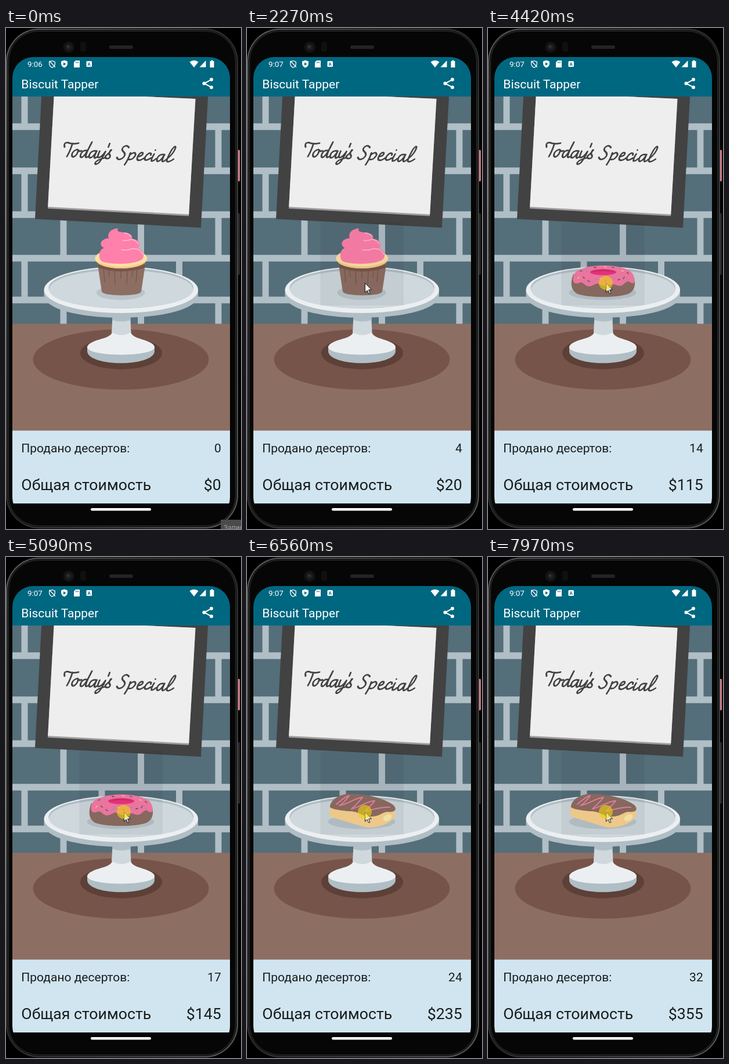
Write an HTML page that moves like this. It is 405x863 px and loops after 8000 ms.

```html
<!DOCTYPE html>
<html lang="ru">
<head>
<meta charset="utf-8">
<title>Biscuit Tapper</title>
<style>
html, body { margin: 0; width: 100%; height: 100%; overflow: hidden; background: #000; }
svg { display: block; width: 405px; height: 863px; }
text { font-family: Roboto, sans-serif; }
.label { font-size: 21px; fill: #191c1e; }
.total { font-size: 26.7px; fill: #191c1e; }
.end { text-anchor: end; }
.line { fill: none; stroke-linecap: round; stroke-linejoin: round; }
</style>
</head>
<body>
<svg viewBox="0 0 405 863">
  <defs>
    <clipPath id="screen"><rect x="11" y="50" width="375" height="795" rx="36"/></clipPath>
    <clipPath id="scene"><path d="M11 118H386V693.5H11Z"/></clipPath>
    <linearGradient id="rim" x2="1" y2="1">
      <stop stop-color="#5a5d5c"/><stop offset=".5" stop-color="#2c2e2d"/><stop offset="1" stop-color="#5a5d5c"/>
    </linearGradient>
  </defs>

  <!-- phone -->
  <rect width="405" height="863"/>
  <rect x="398" y="210" width="5" height="54" rx="1.5" fill="#d67f8e"/>
  <rect x="398" y="319" width="5" height="106" rx="1.5" fill="#2a2a2a"/>
  <rect x="0" y="1" width="400" height="861" rx="57" fill="url(#rim)"/>
  <rect x="2" y="3" width="396" height="857" rx="55" fill="#171818"/>
  <rect x="4.5" y="5.5" width="391" height="852" rx="52" fill="#060606" stroke="#2b2d2d"/>
  <circle cx="108" cy="33" r="9.5" fill="#131414"/>
  <circle cx="108" cy="33" r="5" fill="#1e2122"/>
  <circle cx="107" cy="32" r="2" fill="#34383a"/>
  <rect x="128" y="24" width="10" height="17" rx="4" fill="#101010"/>
  <rect x="178" y="30" width="41" height="6" rx="3" fill="#242424"/>
  <rect x="146" y="827" width="104" height="4.5" rx="2.2" fill="#fff"/>

  <g clip-path="url(#screen)">
    <path d="M11 50H386V119H11Z" fill="#006780"/>
    <path d="M11 693H386V819H11Z" fill="#d0e5ef"/>
  </g>

  <!-- status bar -->
  <g fill="#fff">
    <text id="clock" x="37" y="66.6" font-size="13.4">9:06</text>
    <path class="line" d="M79.5 56.5l4.8 1.8v4q-.8 4-4.8 5.8q-4-1.8-4.8-5.8v-4zM75 57l9.5 10" stroke="#fff" stroke-width="1.3"/>
    <path d="M100.5 55.5l5.5 2v4.5q-.8 4.5-5.5 6.5q-4.7-2-5.5-6.5v-4.5z"/>
    <path d="M99 59.3l4.5 2.7-4.5 2.7z" fill="#006780"/>
    <path d="M120 56h7v12h-10v-9z"/>
    <path d="M120.5 58v2.5m2-2.5v2.5m2-2.5v2.5" stroke="#006780" stroke-width=".9"/>
    <rect x="138.5" y="57" width="9.5" height="10" rx="1.5"/>
    <path class="line" d="M141.2 65l2-5.5 2 5.5m-3.2-1.8h2.4" stroke="#006780"/>
    <path d="M324 68l-7.500-9.500q7.500-5.500 15 0z"/>
    <path d="M333.5 67.5l11-11.5v11.5z"/>
    <path d="M353.5 55.5h3v1.5h2v11h-7v-11h2z"/>
    <text x="26.3" y="104" font-size="21">Biscuit Tapper</text>
    <path d="M354 88.8L341.5 95.5L354 102.2" fill="none" stroke="#fff" stroke-width="2"/>
    <circle cx="354" cy="88.8" r="3"/><circle cx="341.5" cy="95.5" r="3"/><circle cx="354" cy="102.2" r="3"/>
  </g>

  <g clip-path="url(#scene)">
    <!-- wall -->
    <path d="M11 118H386V510H11Z" fill="#546e7a"/>
    <g stroke="#b0bec5">
      <path d="M11 170H386M11 246H386M11 321.5H386M11 396.5H386M11 468.5H386" stroke-width="11.5"/>
      <path d="M32 118v53m0 75v75m0 75v73M165 397v72M298.500 397v72M99 322v75m0 72v41M232.500 322v75m0 72v41M366 170v76m0 76v75m0 72v41" stroke-width="11"/>
    </g>

    <!-- sign -->
    <path d="M61.5 110L348.5 110L336 344L50 329Z" fill="#424242"/>
    <path d="M83 111L326.5 122L315 324L72 311Z" fill="#9e9e9e"/>
    <path d="M83 111L326.5 122L315.2 321L72.2 308Z" fill="#eee"/>
    <g transform="translate(99 221) rotate(3) skewX(-18)">
      <path class="line" stroke="#424242" stroke-width="2.8" aria-label="Today's Special" d="
        M-4-16q-5-8 2-8q9 3 19 0M7-23q1 14-1 23
        M19-13q-6 2-6 8q1 6 5 5q5-4 3-12q2 3 6 1
        M36-12q-7-1-8 6q0 7 4 6q5-3 7-27q-3 20-1 26q2 2 5-2
        M52-12q-8-1-9 6q0 7 4 6q4-2 6-12q-1 8 0 11q2 3 5-2
        M58-12q-1 11 2 11q5 0 8-11q-1 14-4 20q-4 5-6 1q0-6 13-10
        M70-26v6M76-15q-2 7 2 9q3 5-2 6q-4 0-5-3M71-4q4-5 6-11
        M105-21q-5-5-9-1q-4 5 3 9q7 5 2 11q-6 5-10-1
        M111-12q1 10-2 21M111-8q5-6 8-4q4 3 0 9q-3 4-8 2
        M126-6q9-2 6-7q-4-2-6 5q-1 8 4 8q4 0 8-5
        M147-10q0-4-4-3q-5 4-4 10q3 5 10-2
        M152-12q-2 10 0 12q3 1 6-4M151.5-19h.1
        M169-12q-8-1-9 6q0 7 4 6q4-2 6-12q-1 8 0 11q2 3 6-3
        M177-5q8-10 7-20q-2-5-5 4q-3 16-1 20q3 3 10-4"/>
    </g>

    <!-- table and stand -->
    <path d="M11 509.5H386V694H11Z" fill="#8d6e63"/>
    <ellipse cx="198" cy="571" rx="151.5" ry="52" fill="#77544a"/>
    <ellipse cx="198.5" cy="560" rx="70.5" ry="28" fill="#5d4037"/>
    <path d="M140 550V557C142 584 254 584 256 557V550Z" fill="#b0bec5"/>
    <path d="M183 523C182 534 160 535 149 541Q140 545 140 550C141 567 255 567 256 550Q256 545 247 541C236 535 216 534 215 523Z" fill="#eceff1"/>
    <path d="M184 490H214L215.5 524Q199 534 182 524Z" fill="#cfd8dc"/>
    <path d="M184 490H214L214.6 503Q199 508 183.4 503Z" fill="#b0bec5"/>
    <path d="M65.5 450V460C67 512 330 512 331 460V450Z" fill="#b0bec5"/>
    <ellipse cx="198.3" cy="451" rx="132.8" ry="40" fill="#eceff1"/>
    <ellipse cx="198.3" cy="448" rx="125" ry="35" fill="#b0bec5"/>
    <path d="M74 451C78 406 319 406 323 451C316 493 80 493 74 451Z" fill="#cfd8dc"/>
    <ellipse id="shade" cx="197.5" cy="456" rx="42" ry="12.5" fill="#b9c5ca"/>

    <!-- desserts -->
    <g class="dessert">
      <path d="M157 401H241L233 454Q231 460 199 460.5Q168 460 165 454Z" fill="#8d6e63"/>
      <path d="M168 414l2 24m7-21l1 12m9-11l1 24m10-24v14m11-14l-1 24m10-26l-1 13m9-15l-2 24" stroke="#795548" stroke-width="1.3"/>
      <path d="M158 407Q198 423 240 407L239 413Q198 426 159 413Z" fill="#795548"/>
      <ellipse cx="198.3" cy="397" rx="45" ry="17" fill="#ffe0a5"/>
      <path d="M156 402Q198 420 241 402Q234 413 198 414Q163 413 156 402Z" fill="#f5cd88"/>
      <path d="M165 402C158 396 160 381 169 379C159 374 163 363 177 362C174 352 182 346 193 345C190 350 195 352 204 352C214 353 219 358 217 363C228 364 234 372 228 379C237 382 240 393 234 399C220 408 178 408 165 402Z" fill="#ff80ab"/>
      <path class="line" d="M204 353q8 1 11 6M216 364q9 2 12 8M201 366q8 1 14-2M199 382q11 2 18-2l10 1q7 3 8 9" stroke="#ffe1ea"/>
    </g>
    <g class="dessert">
      <path d="M147 424C141 440 143 452 154 458C174 465 222 465 242 458C254 452 256 439 249 424Z" fill="#8d6e63"/>
      <path d="M147 428C151 403 245 403 251 427C256 439 250 442 245 438C238 433 235 443 229 444C221 445 219 439 211 442C203 447 198 444 192 441C185 438 181 446 173 445C165 444 165 436 157 439C149 442 145 438 147 428Z" fill="#f77ba6"/>
      <ellipse cx="198.5" cy="420.5" rx="22.5" ry="5.3" fill="#f0357c"/>
      <path d="M176 421Q198 412 221 421Q198 416 176 421Z" fill="#c92b67"/>
      <g class="line" stroke-width="1.6">
        <path d="M159 419l3-1M172 435l3 2M214 412l3 1M233 432l2-3M202 435l1 2" stroke="#546e7a"/>
        <path d="M183 412l3 1M164 429l2 2M224 434l3-1M240 421l2 2" stroke="#6d4c41"/>
        <path d="M155 431l2-2M193 431l3 1M230 418l3 1M201 411l2 1" stroke="#ffd180"/>
        <path d="M169 417l2 2M184 434l3-2M216 430l2 2M241 433l2 1" stroke="#80a7b0"/>
      </g>
    </g>
    <g class="dessert">
      <path d="M143 427C141 438 141 446 149 449L202 465C222 469 247 459 253 449Q257 440 255 430Z" fill="#fad390"/>
      <path d="M143 429C146 416 161 408 178 408C208 408 237 416 252 427C260 435 254 440 244 439C234 438 230 447 214 447C200 448 194 439 180 438C163 437 141 434 143 429Z" fill="#8d6e63"/>
      <path class="line" d="M154 426C162 419 170 412 176 411C172 418 161 428 159 428C172 427 188 414 199 414C195 420 182 432 180 434C194 431 208 420 220 420C217 426 206 434 204 438C217 435 229 430 246 431" stroke="#ee7fa0" stroke-width="2"/>
      <ellipse cx="242" cy="449" rx="8" ry="5" transform="rotate(-30 242 449)" fill="#ffebad"/>
    </g>
    <rect id="ripple" x="126.5" y="334.5" width="143.5" height="143.5"/>
  </g>

  <!-- totals -->
  <text class="label" x="26.3" y="730.8">Продано десертов:</text>
  <text class="label end" id="sold" x="370.7" y="730.8">0</text>
  <text class="total" x="26.3" y="796">Общая стоимость</text>
  <text class="total end" id="revenue" x="370.7" y="796">$0</text>

  <g id="tip">
    <path d="M370 847H405V863H370Z" fill="#4b4b4b"/>
    <text x="375" y="865" font-size="12" fill="#a2a2a2">Запись</text>
  </g>
  <path id="cursor" d="M.5.5V16.500L4.200 13L6.700 18.700L9 17.700L6.500 12H11.500Z" fill="#fff" stroke="#111"/>
  <circle id="press" cx="203" cy="439" r="12" fill="#ead010" fill-opacity=".64"/>
</svg>
<script>
const LOOP = 8000, HOLD = 100, FIRST_PRESS = 1290;
const $ = id => document.getElementById(id);
const desserts = [...document.querySelectorAll('.dessert')];
const menu = [{ from: 0, price: 5 }, { from: 5, price: 10 }, { from: 20, price: 15 }];

// [sale number, release time]; sales between are evenly spaced
const pace = [[1, 1390], [7, 3020], [14, 4300], [21, 5750], [22, 6000], [28, 7240], [32, 7900], [33, 8065]];
const releases = [pace[0][1]];
for (let i = 1; i < pace.length; i++) {
  const [n0, t0] = pace[i - 1], [n1, t1] = pace[i];
  for (let n = n0 + 1; n <= n1; n++) releases.push(t0 + (t1 - t0) * (n - n0) / (n1 - n0));
}

const itemAt = sold => menu.findLastIndex(d => sold >= d.from);
const show = (el, on) => el.setAttribute('visibility', on ? 'visible' : 'hidden');

function moveCursor(t) {
  const p = Math.min(9, Math.max(0, Math.floor((t - 410) / 66.6))) / 9;
  const left = (1 - p) ** 2;
  const x = 203 + 150 * left;
  const y = t < 1150 ? 442 + 406 * left : 439;
  $('cursor').setAttribute('transform', `translate(${x} ${y})`);
  show($('cursor'), t >= 410);
}

function draw(t) {
  const sold = releases.filter(r => r <= t).length;
  let revenue = 0;
  for (let n = 0; n < sold; n++) revenue += menu[itemAt(n)].price;
  const item = itemAt(sold);

  desserts.forEach((el, i) => show(el, i === item));
  $('shade').setAttribute('rx', item ? 58 : 42);
  $('sold').textContent = sold;
  $('revenue').textContent = '$' + revenue;
  $('clock').textContent = t < 270 ? '9:06' : '9:07';
  show($('tip'), t < 70);
  show($('press'), releases.some(r => t >= r - HOLD && t < r));
  $('ripple').setAttribute('opacity', .05 * Math.min(1, Math.max(0, (t - FIRST_PRESS) / 300)));
  moveCursor(t);
}

const start = performance.now();
function tick() {
  draw((performance.now() - start) % LOOP);
  requestAnimationFrame(tick);
}
tick();
</script>
</body>
</html>
```
